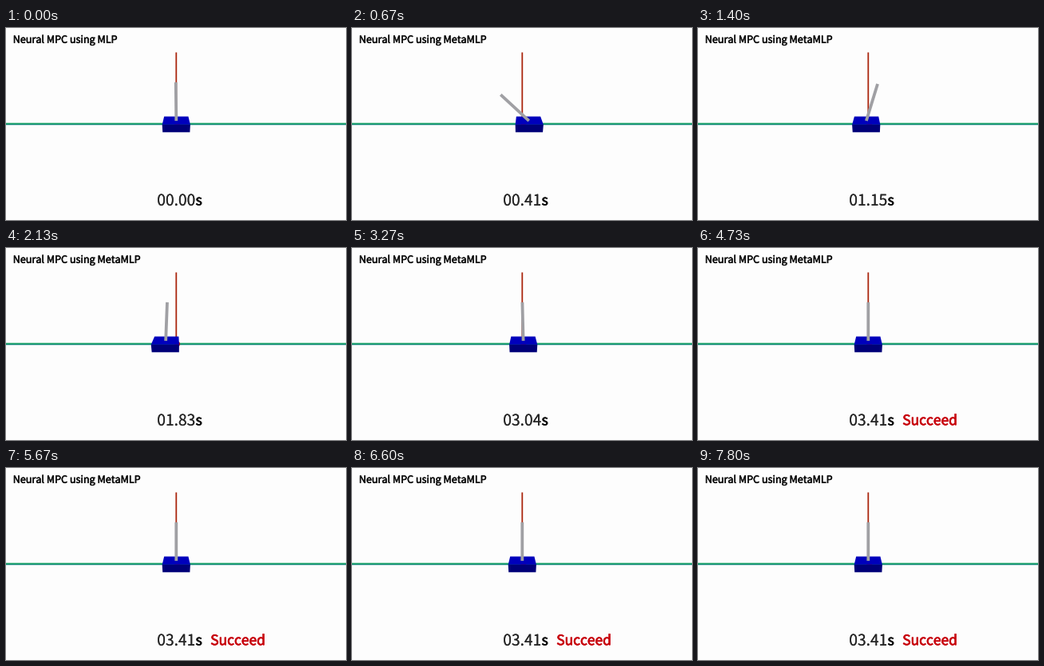
Write a matplotlib script that moves like this. It is 426 px wide and 240 px high and loops after 7.87 s.

```python
import numpy as np
import matplotlib.pyplot as plt
from matplotlib.animation import FuncAnimation
from matplotlib.patches import Circle, Polygon
from matplotlib.patheffects import withStroke

W, H, DPI = 426, 240, 96
FRAMES, LOOP = 118, 7870
STEP = LOOP / FRAMES
MID, RAIL_Y, PIVOT_Y, POLE = 213.3, 120, 116, 48.2
HALF = 17.6                   # half width of the cart's front face
GOAL = 3.41                   # final clock reading, seconds

fig = plt.figure(figsize=(W / DPI, H / DPI), dpi=DPI, facecolor="#fdfdfd")
ax = fig.add_axes([0, 0, 1, 1])
ax.set(xlim=(0, W), ylim=(H, 0))
ax.axis("off")


def px(n):
    return n * 72 / DPI


def stroke(x, y, color, width, z):
    return ax.plot(x, y, color=color, lw=px(width), zorder=z,
                   solid_capstyle="butt", snap=False)[0]


def label(x, y, text, size, color="#0c0c0c", bold=0.5):
    """Text thickened by an outline of `bold` pixels."""
    return ax.text(x, y, text, fontsize=px(size), color=color, va="baseline",
                   family="Noto Sans CJK JP", zorder=8,
                   path_effects=[withStroke(linewidth=px(bold), foreground=color)])


def face(color):
    return ax.add_patch(Polygon([(0, 0)] * 4, fc=color, ec="none", zorder=4))


stroke([0, W], [RAIL_Y - 0.5] * 2, "#1ca468", 1.7, 2)
stroke([0, W], [RAIL_Y + 0.3] * 2, "#127f84", 1.9, 1)
stroke([MID, MID], [30.5, 118], "#ab260f", 1.8, 2)
ax.add_patch(Circle((MID + 1.4, RAIL_Y), 3.4, fc="#b01818", ec="none", zorder=3))

top, front = face("#0000bc"), face("#000078")
pole = stroke([], [], "#a0a0a4", 3.8, 5)

title = label(8.7, 18.7, "", 12.6)
clock = label(189.3, 221.8, "", 19.2, "#262626", 0.1)
label(237.6, 221.4, "s", 17.4, bold=0.7)
verdict = label(256.2, 221.2, "Succeed", 17.4, "#c8000c", 0.7)


def bump(t, center, width):
    return np.exp(-((t - center) / width) ** 2)


def cart_shift(t):
    """Push right as the pole falls, catch it on the left, settle."""
    return 10 * bump(t, 0.75, 0.25) - 14 * bump(t, 2.05, 0.5) + 1.4 * bump(t, 3.27, 0.2)


def pole_angle(t):
    """One full turn, then a small sway; degrees clockwise from upright."""
    turn = 360 / (1 + np.exp((t - 0.95) / 0.15))
    return turn + 2 * bump(t, 2.13, 0.4) - 1.4 * bump(t, 3.27, 0.2)


def draw(i):
    t = i * STEP / 1000
    shift, angle = cart_shift(t), np.radians(pole_angle(t))

    def edge(y, scale):
        return [(MID + scale * (shift + side * HALF), y) for side in (-1, 1)]

    back, lip, base = edge(110.6, 0.86), edge(120.8, 1), edge(130.3, 0.97)
    top.set_xy(back + lip[::-1])
    front.set_xy(lip + base[::-1])

    x = MID + 0.94 * shift
    pole.set_data([x, x + POLE * np.sin(angle)],
                  [PIVOT_Y, PIVOT_Y - POLE * np.cos(angle)])
    pole.set_zorder(5 if np.cos(angle) > 0 else 3)

    title.set_text("Neural MPC using " + ("MLP" if i == 0 else "MetaMLP"))
    secs = np.clip(1.0125 * t - 0.268, 0, GOAL)
    clock.set_text(f"{secs:05.2f}")
    verdict.set_visible(secs >= GOAL)
    return top, front, pole, title, clock, verdict


anim = FuncAnimation(fig, draw, frames=FRAMES, interval=STEP,
                     repeat=True, repeat_delay=0, blit=False)
plt.show()
```
